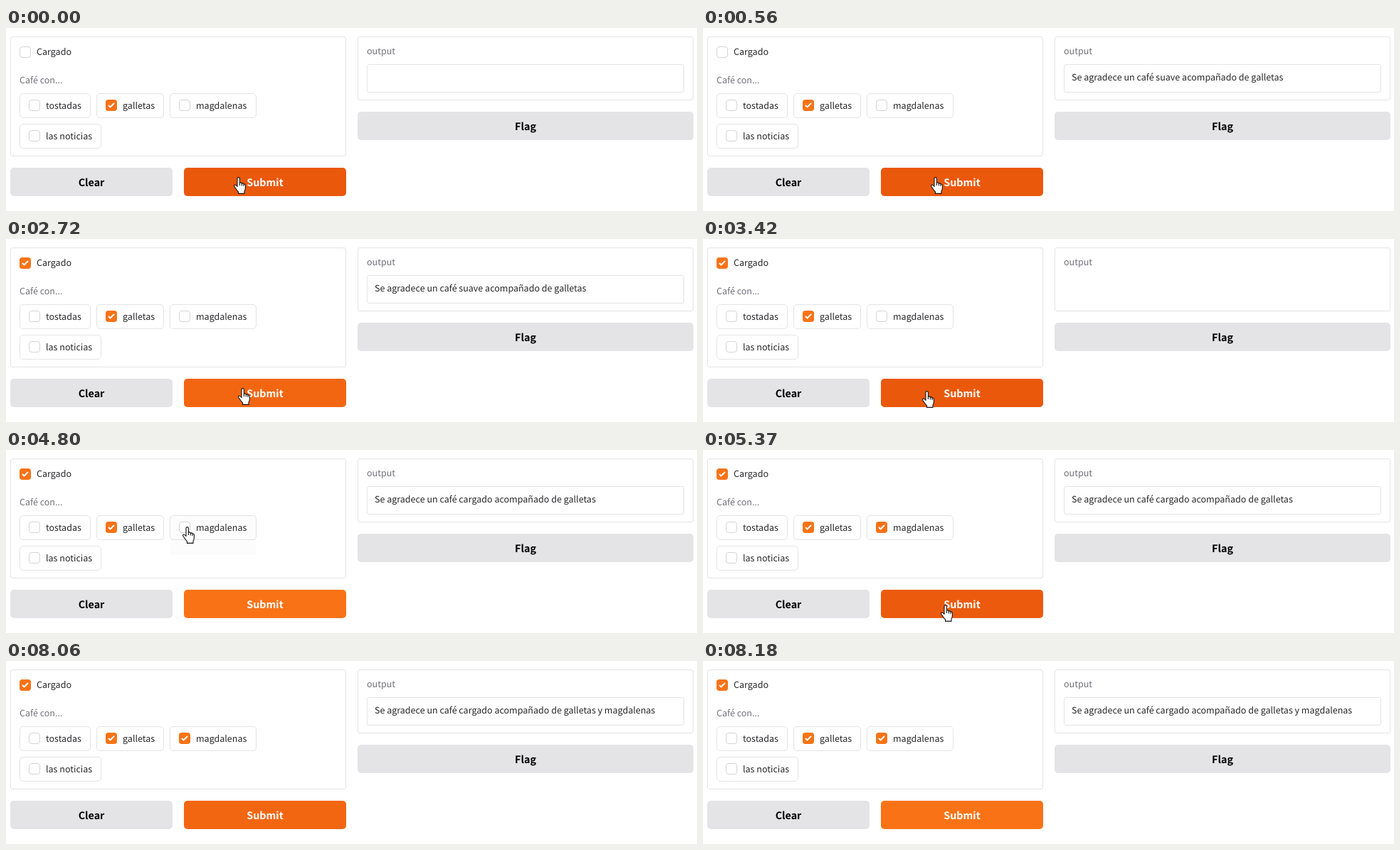
Animation of 971x258 px, one loop 8600 ms. Source, as an HTML page:

```html
<!DOCTYPE html>
<html lang="es">
<head>
<meta charset="utf-8">
<title>Café</title>
<style>
  html, body { margin: 0; width: 100%; height: 100%; overflow: hidden; background: #fff; }
  svg { display: block; width: 971px; height: 258px; }
  text {
    font: 400 12.53px "Noto Sans CJK JP", "Noto Sans CJK SC", "Noto Sans CJK", "Noto Sans", sans-serif;
    fill: #27272a; white-space: pre; text-rendering: geometricPrecision;
  }
  text.dim { fill: #71717a; }
  text.btn { font-size: 14.3px; font-weight: 600; text-anchor: middle; fill: #000; }
  text.light { fill: #fff; }
</style>
</head>
<body>
<svg id="stage" viewBox="0 0 971 258"></svg>
<script>
const LOOP = 8600;
const LINE = '#e4e4e7', ORANGE = '#f97316', MID = '#f26611', DARK = '#ea580c';
const stage = document.getElementById('stage');

function add(tag, attrs, parent = stage) {
  const el = document.createElementNS('http://www.w3.org/2000/svg', tag);
  for (const key in attrs) el.setAttribute(key, attrs[key]);
  parent.appendChild(el);
  return el;
}

function label(x, y, str, cls = '', parent = stage) {
  const el = add('text', { x, y, class: cls }, parent);
  el.textContent = str;
  return el;
}

// Outlined box given by its outer edges
function frame(x, y, w, h, r, parent = stage, stroke = LINE) {
  return add('rect', { x: x + .5, y: y + .5, width: w - 1, height: h - 1, rx: r, fill: '#fff', stroke }, parent);
}

function button(x, y, w, str, fill, cls = '') {
  const rect = add('rect', { x, y, width: w, height: 40, rx: 5, fill });
  label(x + w / 2, y + 26, str, 'btn ' + cls);
  return rect;
}

function checkbox(x, y) {
  frame(x, y, 16, 16, 3.5, stage, '#d4d4d8');
  const on = add('g', { transform: `translate(${x} ${y})` });
  add('rect', { width: 16, height: 16, rx: 4, fill: ORANGE }, on);
  add('path', {
    d: 'M4.5 8.5L6.5 10.5L11.5 5.5', fill: 'none', stroke: '#fff',
    'stroke-width': 2, 'stroke-linecap': 'round', 'stroke-linejoin': 'round'
  }, on);
  return on;
}

function option(x, y, w, str) {
  const box = frame(x, y, w, 35, 4.5);
  const check = checkbox(x + 13, y + 9);
  label(x + 37, y + 22, str);
  return { box, check };
}

// Left panel
frame(6, 12, 472, 169, 2.5);
const strong = checkbox(19, 26);
label(43, 38, 'Cargado');
label(19, 78, 'Café con...', 'dim');
const shade = add('rect', { x: 231, y: 127, width: 121, height: 21, fill: '#fcfcfc' });
const toast = option(19, 92, 100, 'tostadas');
const cookies = option(127, 92, 95, 'galletas');
const muffins = option(230, 92, 122, 'magdalenas');
const news = option(19, 135, 115, 'las noticias');
button(6, 197, 228, 'Clear', LINE);
const submit = button(250, 197, 228, 'Submit', ORANGE, 'light');

// Right panel
frame(494, 12, 472, 90, 2.5);
label(507, 37, 'output', 'dim');
const field = add('g', {});
frame(507, 51, 446, 40, 2.5, field);
const result = label(518, 74, '', '', field);
button(494, 118, 472, 'Flag', LINE);

// Pointers
const ink = { fill: '#fff', stroke: '#111', 'stroke-width': 1.1, 'stroke-linejoin': 'round' };
const hand = add('g', ink);
add('path', {
  d: 'M5 13.5V2.5Q5 .6 6.7 .6Q8.4 .6 8.4 2.5V8Q10.6 7.4 11.3 9Q13.3 8.5 14 10Q16.4 9.8 16.4 12V15.5' +
     'Q16.4 18 15 20V23.4H6.5V21Q4.5 19 3 16.5L.8 13.2Q.2 11.5 1.8 11Q3 11 5 13.5Z'
}, hand);
add('path', { d: 'M8.4 8V12M11.3 9V12.5M14 10V13', fill: 'none' }, hand);
const arrow = add('path', { ...ink, d: 'M.6 .8V16.4L4.2 13L6.6 18.4L9 17.3L6.7 12.2H11.6Z' });

const show = (el, on) => el.setAttribute('visibility', on ? 'visible' : 'hidden');

// Latest row whose start time has passed
const at = (rows, t) => rows.reduce((now, row) => row[0] <= t ? row : now);

// start, pointer, left, top
const moves = [
  [0, hand, 320, 210], [1450, arrow, 372, 186], [1570, arrow, 290, 138],
  [1690, arrow, 190, 94], [1820, arrow, 102, 58], [1940, hand, 48, 37],
  [2090, hand, 44, 34], [2330, hand, 52, 36], [2450, arrow, 182, 118],
  [2570, arrow, 288, 185], [2720, hand, 326, 210], [2850, hand, 308, 214],
  [4210, arrow, 278, 160], [4380, arrow, 244, 124], [4530, hand, 246, 110],
  [4680, hand, 247, 109], [4800, hand, 248, 108], [4950, hand, 250, 108],
  [5100, hand, 254, 113], [5250, arrow, 298, 172], [5370, hand, 334, 218],
  [5520, hand, 330, 219], [5640, hand, 326, 219], [5760, hand, 323, 218],
  [5880, hand, 321, 218], [8060, null, 0, 0]
];

const fills = [
  [0, DARK], [1450, MID], [1570, ORANGE], [2720, MID], [2850, DARK], [4210, MID],
  [4380, ORANGE], [5370, '#ec5b0d'], [5520, DARK], [8060, MID], [8180, ORANGE]
];

const phrase = (kind, extra) => `Se agradece un café ${kind} acompañado de galletas${extra}`;

// start, text, field opacity, text opacity
const outputs = [
  [0, '', 1, 1], [280, '', .3, 1], [410, '', 0, 1],
  [560, phrase('suave', ''), 1, 1], [3420, '', 0, 1],
  [3570, phrase('cargado', ''), 1, 1],
  [6320, phrase('cargado', ' y magdalenas'), 1, .5],
  [6440, phrase('cargado', ' y magdalenas'), 1, 1]
];

function draw(t) {
  show(toast.check, false);
  show(news.check, false);
  show(cookies.check, true);
  show(strong, t >= 2210);
  show(muffins.check, t >= 4950);

  const hover = t >= 4530 && t < 5250;
  muffins.box.setAttribute('fill', hover ? '#fcfcfc' : '#fff');
  show(shade, hover);
  submit.setAttribute('fill', at(fills, t)[1]);

  const [, str, fieldAlpha, textAlpha] = at(outputs, t);
  if (result.textContent !== str) result.textContent = str;
  field.setAttribute('opacity', fieldAlpha);
  result.setAttribute('opacity', textAlpha);

  const [, pointer, x, y] = at(moves, t);
  for (const el of [hand, arrow]) show(el, el === pointer);
  if (pointer) pointer.setAttribute('transform', `translate(${x} ${y})`);
}

const start = performance.now();
function tick() {
  draw((performance.now() - start) % LOOP);
  requestAnimationFrame(tick);
}
tick();
</script>
</body>
</html>
```
